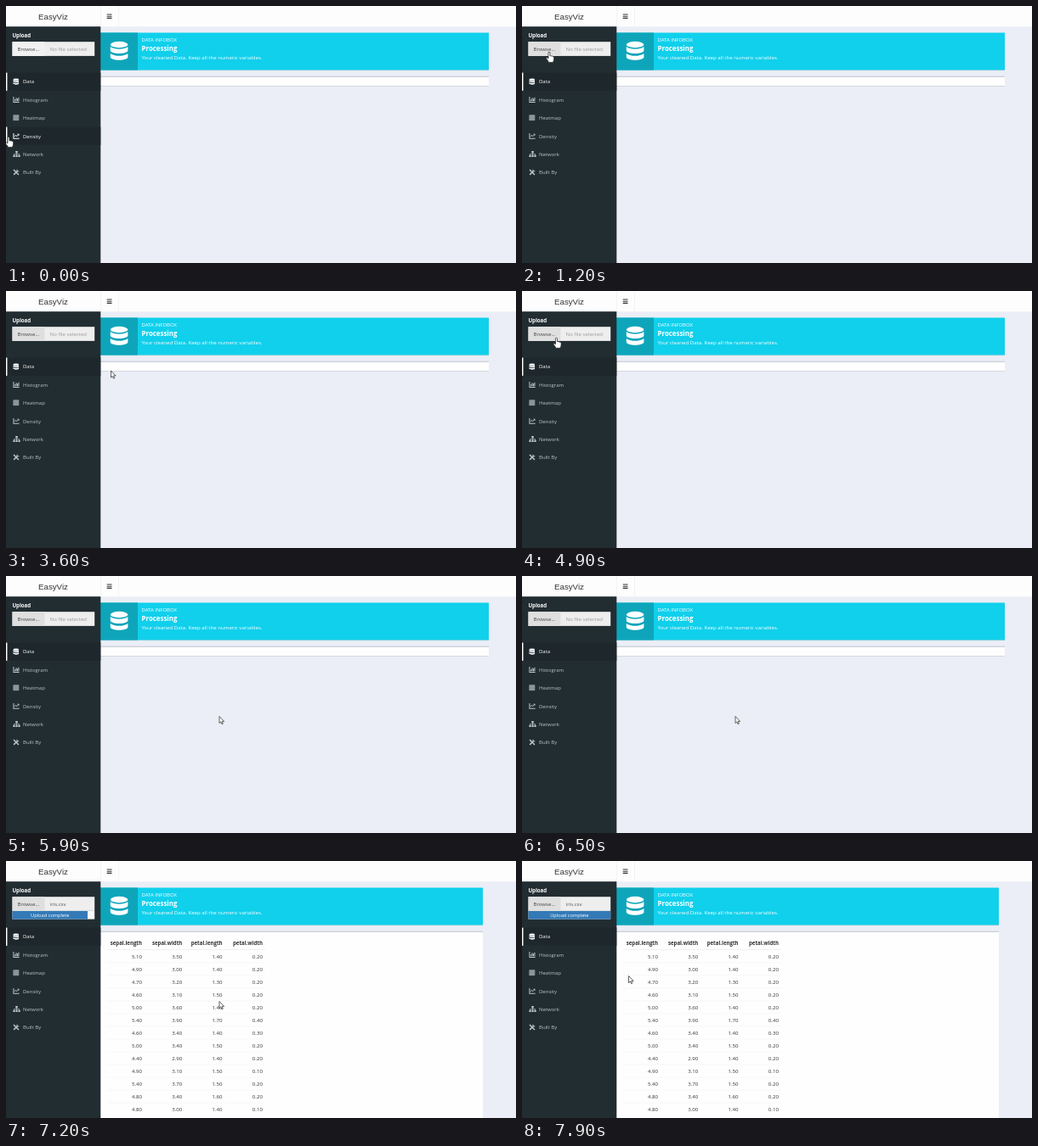
Animation, 600 px wide and 303 px high, one loop 8000 ms. Source, as an HTML page:

```html
<!DOCTYPE html>
<html lang="en">
<head>
<meta charset="utf-8">
<title>EasyViz</title>
<style>
  html, body { margin: 0; width: 100%; height: 100%; overflow: hidden; background: #ebeef6; }
  svg { display: block; width: 100%; height: 100%; }
  text { font: 6.1px "Open Sans", "Noto Sans", sans-serif; }
  .bold { font-weight: 700; }
  .brand { font: 9.7px "Liberation Sans", Arial, sans-serif; fill: #333; }
  .end { text-anchor: end; }
  .mid { text-anchor: middle; }
  .white text { fill: #fff; }
  .item { fill: #b8c7ce; color: #b8c7ce; }
  .item text { font-size: 6px; }
  .item .back { fill: none; }
  .item .edge { fill: none; }
  .item.on { fill: #fff; color: #fff; }
  .item.on .back { fill: #1e282c; }
  .item.on .edge { fill: #fff; }
  .line { fill: none; stroke: currentColor; }
  #table text { fill: #333; }
</style>
</head>
<body>
<svg viewBox="0 0 600 303">
  <defs>
    <g id="disks">
      <ellipse cx="10.5" cy="3.7" rx="10.3" ry="3.7"/>
      <path id="disk" d="M.2 6.2Q4 9 10.5 9T20.8 6.2V10.4C20.8 15.4 .2 15.4 .2 10.4Z"/>
      <use href="#disk" y="7.9"/>
    </g>
  </defs>
  <rect width="600" height="303" fill="#ebeef6"/>
  <rect width="600" height="24.2" fill="#fdfdfe"/>
  <path d="M111.5 0V24M132.5 0V24" stroke="#eee" stroke-width=".7"/>
  <text class="brand mid" x="55.5" y="16">EasyViz</text>
  <path d="M118.7 10h5.8M118.7 12.2h5.8M118.7 14.4h5.8" stroke="#333" stroke-width="1.1"/>

  <g class="white">
    <rect id="infoShadow" x="111" y="32" height="44.2" fill="#cbd2d8"/>
    <rect id="info" x="111" y="31.5" height="44" fill="#10d0ec"/>
    <rect x="111" y="31.5" width="44" height="44" fill="#0ea5ba"/>
    <use href="#disks" x="122.6" y="41.8" fill="#fff"/>
    <text x="159.5" y="41.6" style="font-size:5.95px">DATA INFOBOX</text>
    <text class="bold" x="159.5" y="53" style="font-size:7.9px">Processing</text>
    <text x="159.5" y="63.3">Your cleaned Data. Keep all the numeric variables.</text>
  </g>

  <rect id="boxShadow" x="111" y="83" fill="#c9cdd3"/>
  <rect id="box" x="111" y="83" fill="#fefefe"/>
  <rect id="boxTop" x="111" y="82.6" height="1.4" fill="#cdd1d9"/>
  <g id="table"></g>

  <rect y="24.2" width="111.3" height="278.8" fill="#222d32"/>
  <g id="menu"></g>
  <text class="bold" x="7.5" y="37.4" fill="#fff">Upload</text>
  <rect x="7.5" y="42.2" width="96.7" height="16.7" fill="#eee"/>
  <rect id="browse" x="7.5" y="42.2" width="38" height="16.7"/>
  <text x="13.5" y="52.8" fill="#444">Browse...</text>
  <text id="file" x="51.6" y="52.8"></text>
  <g id="progress">
    <rect x="7.5" y="59" width="96.7" height="9.6" fill="#f8f8f8"/>
    <rect id="bar" x="7.5" y="59" height="9.6" fill="#337ab7"/>
    <text id="status" class="mid" y="65.8" fill="#fff" style="font-size:5.7px"></text>
  </g>

  <path id="arrow" d="M0 0V8L1.8 6.4 3 9.2 4.3 8.6 3.1 5.9H5.6Z" fill="#fff" stroke="#222" stroke-width=".7"/>
  <path id="hand" d="M-1-.2Q0-1.2 1-.2V4Q2 3.2 2.7 4.1 3.6 3.5 4.2 4.5 5.6 4.2 5.6 5.6V8Q5.3 9.6 4.5 11.4H-.6Q-1.4 9.3-3 7.6-4 5.9-2.7 5.6L-1 6.9Z" fill="#fff" stroke="#222" stroke-width=".7"/>
</svg>
<script>
const LOOP = 8000, STEP = 100;
const BAR_WIDTH = 96.7;
const $ = id => document.getElementById(id);
const set = (id, attrs) => {
  for (const name in attrs) $(id).setAttribute(name, attrs[name]);
};

const MENU = [
  ["Data", '<use href="#disks" transform="scale(.32)"/>'],
  ["Histogram", '<path d="M0 0H1V6H7.2V7H0ZM1.8 3H2.8V5.3H1.8ZM3.2 1.3H4.2V5.3H3.2ZM4.6 2.3H5.6V5.3H4.6ZM6 .7H7V5.3H6Z"/>'],
  ["Heatmap", '<rect width="6.8" height="6.8" opacity=".55"/><path class="line" stroke-width=".6" d="M0 2L2 0M0 4L4 0M0 6L6 0M1 6.8L6.8 1M3 6.8L6.8 3M5 6.8L6.8 5"/>'],
  ["Density", '<path d="M0 .4H1V6H7.2V7H0ZM4.6 1H7V3.4Z"/><path class="line" d="M1.7 4.2L3 2.6 4.5 4 6.4 1.8"/>'],
  ["Network", '<path d="M2.8 0H5.4V2.3H2.8ZM0 4.8H2.2V7H0ZM3 4.8H5.2V7H3ZM6 4.8H8.2V7H6Z"/><path class="line" stroke-width=".7" d="M4.1 2V5M1.1 5V3.6H7.1V5"/>'],
  ["Built By", '<path class="line" stroke-width="1.5" d="M.6 .6L6.5 6.7M.7 6.5L5.2 2.2"/><path class="line" d="M4.6 .4L4.7 2.5 6.9 2.5"/>'],
];
const itemY = i => 78.6 + 21.35 * i;
$("menu").innerHTML = MENU.map(([label, icon], i) => `
  <g class="item" transform="translate(0 ${itemY(i)})">
    <rect class="back" width="111.3" height="21.3"/>
    <rect class="edge" width="1.45" height="21.3"/>
    <g transform="translate(8.4 7)">${icon}</g>
    <text x="20" y="12.9">${label}</text>
  </g>`).join("");
const items = [...document.querySelectorAll(".item")];

const COLUMNS = ["sepal.length", "sepal.width", "petal.length", "petal.width"];
const ROWS = [
  [5.1, 3.5, 1.4, .2], [4.9, 3, 1.4, .2], [4.7, 3.2, 1.3, .2], [4.6, 3.1, 1.5, .2],
  [5, 3.6, 1.4, .2], [5.4, 3.9, 1.7, .4], [4.6, 3.4, 1.4, .3], [5, 3.4, 1.5, .2],
  [4.4, 2.9, 1.4, .2], [4.9, 3.1, 1.5, .1], [5.4, 3.7, 1.5, .2], [4.8, 3.4, 1.6, .2],
  [4.8, 3, 1.4, .1],
];
const cells = (values, y, style = "") => values.map((value, i) =>
  `<text class="end ${style}" x="${160 + 47.3 * i}" y="${y}">${value}</text>`).join("");
const rule = (y, color) => `<path d="M119 ${y}H305" stroke="${color}" stroke-width=".6"/>`;
$("table").innerHTML = cells(COLUMNS, 99.2, "bold") + rule(104.6, "#e6e6e6") +
  ROWS.map((row, i) => cells(row.map(v => v.toFixed(2)), 114.6 + 15.04 * i) +
    rule(119.7 + 15.04 * i, "#f1f1f1")).join("");

// Keys are [time, ...values]; equal neighbours make a rest.
const POINTER = [
  [0, 3, 155], [900, 32, 55], [2900, 32, 55], [3600, 123.5, 94], [3700, 123.5, 94],
  [3900, 191, 103], [4100, 191, 103], [4500, 33, 52], [4800, 33, 52],
  [5700, 251, 165.5], [7600, 251, 165.5], [7900, 125.5, 135.5],
];
const UPLOAD = [[6700, 0], [6900, .68], [7000, .84], [7100, .895], [7200, .915], [7600, 1]];
const smooth = p => p * p * (3 - 2 * p);
function track(keys, t, ease = p => p) {
  const next = keys.findIndex(key => key[0] > t);
  if (next < 0) return keys.at(-1).slice(1);
  if (next === 0) return keys[0].slice(1);
  const a = keys[next - 1], b = keys[next];
  const p = ease((t - a[0]) / (b[0] - a[0]));
  return a.slice(1).map((v, i) => v + (b[i + 1] - v) * p);
}

function draw(t) {
  const uploading = t >= 6800, loaded = t >= 7200;
  const [x, y] = track(POINTER, t, smooth);

  const hovered = x < 111 ? Math.floor((y - itemY(0)) / 21.35) : -1;
  items.forEach((item, i) => item.classList.toggle("on", i === 0 || i === hovered));
  const onBrowse = x > 7 && x < 46 && y > 42 && y < 59;
  const onLink = onBrowse || hovered >= 0 && hovered < MENU.length;
  set("browse", { fill: onBrowse || t >= 900 ? "#dfdfdf" : "#f1f1f1" });
  for (const id of ["arrow", "hand"]) {
    set(id, { transform: `translate(${x} ${y})`, display: (id === "hand") === onLink ? "inline" : "none" });
  }

  $("file").textContent = uploading ? "iris.csv" : "No file selected";
  set("file", { fill: uploading ? "#555" : "#999" });
  const filled = BAR_WIDTH * track(UPLOAD, t)[0];
  set("progress", { display: uploading ? "inline" : "none" });
  set("bar", { width: filled });
  set("status", { x: 7.5 + filled / 2, display: filled > 45 ? "inline" : "none" });
  $("status").textContent = loaded ? "Upload complete" : "Finishing upload";

  const width = loaded ? 450 : 457;
  for (const id of ["info", "infoShadow", "box", "boxShadow", "boxTop"]) set(id, { width });
  set("box", { height: loaded ? 220 : 11 });
  set("boxShadow", { height: loaded ? 220 : 11.7 });
  set("table", { display: loaded ? "inline" : "none" });
}

function frame(now) {
  draw(Math.floor(now % LOOP / STEP) * STEP);
  requestAnimationFrame(frame);
}
draw(0);
requestAnimationFrame(frame);
</script>
</body>
</html>
```
